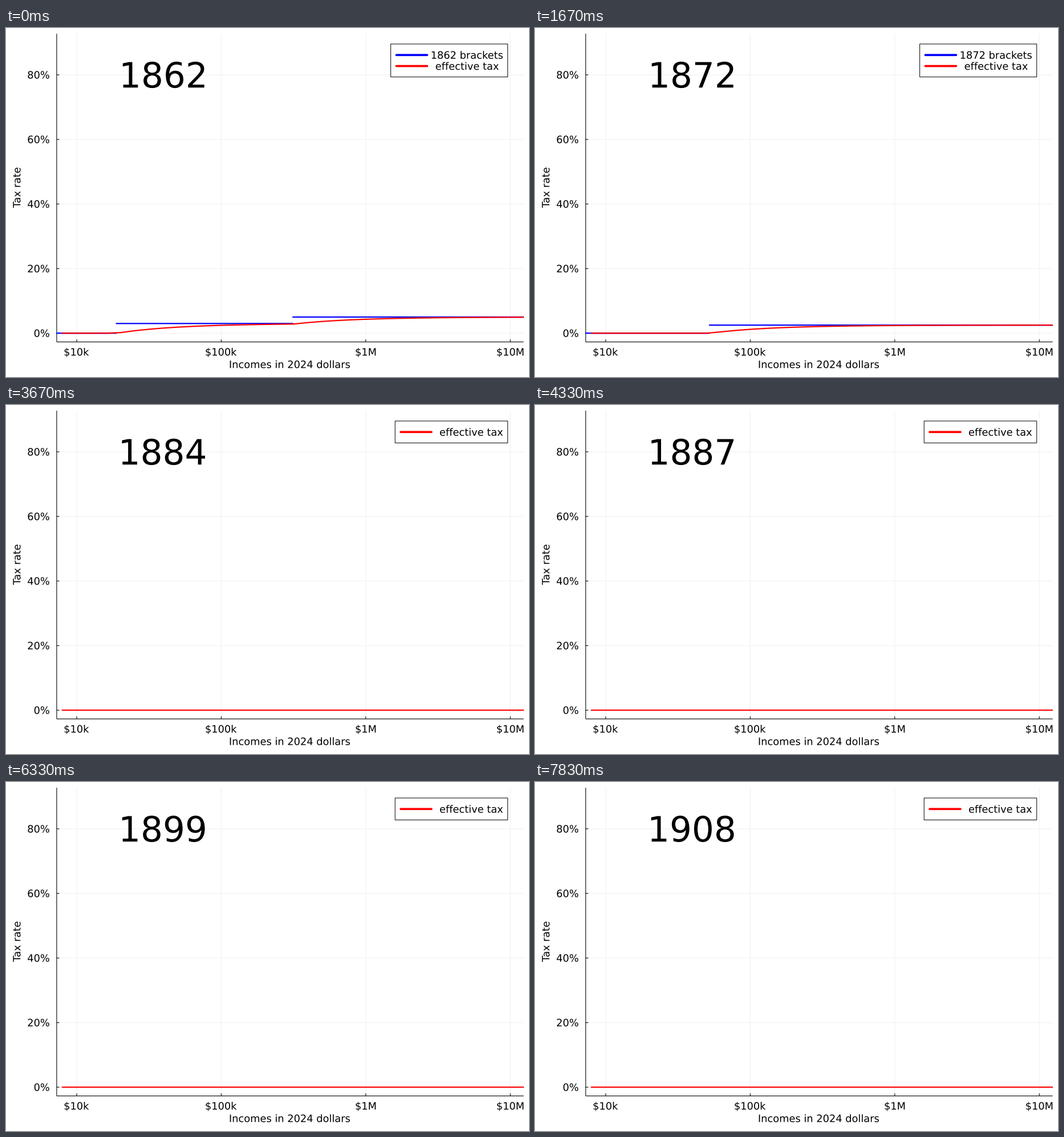
Animation of 917x611 px, one loop 8000 ms. Source, as a matplotlib script:

```python
import numpy as np
import matplotlib.pyplot as plt
from matplotlib.animation import FuncAnimation
from matplotlib.patches import PathPatch, Rectangle
from matplotlib.path import Path
from matplotlib.textpath import TextPath

W, H, DPI = 917, 611, 100
LEFT, RIGHT, TOP, BOTTOM = 88.9, 907.6, 10, 549.6
FIRST_YEAR, YEARS, LOOP_MS = 1862, 48, 8000
SIZE, BIG = 17.8, 61.2
CAP = 0.729  # cap height of the font, in em

# Price index by year; 2024 on the same scale
CPI_2024 = 939
CPI = {1862: 30, 1863: 37, 1864: 47, 1865: 46, 1866: 44, 1867: 42,
       1868: 40, 1869: 40, 1870: 38, 1871: 36, 1872: 36, 1894: 26}

# (first year, last year, [(threshold in dollars of the day, rate in %)])
LAWS = [
    (1862, 1863, [(600, 3), (10000, 5)]),
    (1864, 1864, [(600, 5), (5000, 7.5), (10000, 10)]),
    (1865, 1866, [(600, 5), (5000, 10)]),
    (1867, 1869, [(1000, 5)]),
    (1870, 1872, [(2000, 2.5)]),
    (1894, 1894, [(4000, 2)]),
]

plt.rcParams["path.snap"] = False
plt.rcParams["font.family"] = "DejaVu Sans"

fig = plt.figure(figsize=(W / DPI, H / DPI), dpi=DPI, facecolor="white")
ax = fig.add_axes([0, 0, 1, 1])
ax.set_xlim(0, W)
ax.set_ylim(H, 0)
ax.axis("off")
plot_area = Rectangle((LEFT - 0.5, TOP), RIGHT - LEFT + 0.5, BOTTOM - TOP,
                      transform=ax.transData)


def x_pos(income):
    return 124 + 253.4 * (np.log10(income) - 4)


def y_pos(rate):
    return 534.3 - 5.654 * np.asarray(rate)


def line(xs, ys, color, width, z=2, cap="round", clip=False):
    art, = ax.plot(xs, ys, color=color, lw=width * 72 / DPI, zorder=z,
                   solid_capstyle=cap, solid_joinstyle="round")
    if clip:
        art.set_clip_path(plot_area)
    return art


def text(s, x, y, size=SIZE, align=0.5, upright=False):
    """Place text by its ink: align 0 left, 0.5 centre, 1 right; y is mid-cap."""
    path = TextPath((0, 0), s, size=size)
    v = path.vertices.copy()
    box = path.get_extents()
    v[:, 0] -= box.x0 + align * box.width
    v[:, 1] = CAP * size / 2 - v[:, 1]
    if upright:
        v = np.column_stack([v[:, 1], -v[:, 0]])
    return ax.add_patch(PathPatch(Path(v + [x, y], path.codes),
                                  fc="black", lw=0, zorder=6))


def law_for(year):
    for start, end, steps in LAWS:
        if start <= year <= end:
            scale = CPI_2024 / CPI[year]
            return [(limit * scale, rate) for limit, rate in steps]
    return []


def effective(income, steps):
    tax = np.zeros_like(income)
    last = 0
    for limit, rate in steps:
        tax += (rate - last) * np.maximum(income - limit, 0)
        last = rate
    return tax / income


def draw_frame():
    for rate in range(0, 100, 20):
        y = y_pos(rate)
        line([LEFT, RIGHT], [y, y], "#f0f0f0", 1, 0, "butt")
        line([LEFT, LEFT + 4.5], [y, y], "black", 1.1, 1, "butt")
        text(f"{rate}%", 75.8, y, align=1)
    for power, label in enumerate(["$10k", "$100k", "$1M", "$10M"], 4):
        x = x_pos(10.0 ** power)
        line([x, x], [TOP, BOTTOM], "#f0f0f0", 1, 0, "butt")
        line([x, x], [BOTTOM, BOTTOM - 4.5], "black", 1.1, 1, "butt")
        text(label, x, 567)
    line([LEFT, LEFT], [TOP, BOTTOM], "black", 1.1, 1, "butt")
    line([LEFT, RIGHT], [BOTTOM, BOTTOM], "black", 1.1, 1, "butt")
    text("Incomes in 2024 dollars", 497.8, 588.8)
    text("Tax rate", 18.8, 279.7, upright=True)


def draw_legend(entries, left, bottom, mid):
    box = Rectangle((left, 28), 879.7 - left, bottom - 28, fc="white",
                    ec="black", lw=0.72, zorder=4)
    arts = [ax.add_patch(box)]
    for i, (label, color) in enumerate(entries):
        y = 47.3 + 19.3 * i
        arts.append(line([left + 9.8, left + 63.8], [y, y], color, 3.7, 5))
        arts.append(text(label, mid, y))
    return arts


incomes = 10 ** np.arange(3.9, 7.25, 0.1)
moving = []


def clear():
    while moving:
        moving.pop().remove()
    return []


def update(i):
    clear()
    year = FIRST_YEAR + i
    steps = law_for(year)
    entries = [("effective tax", "red")]
    if steps:
        entries.insert(0, (f"{year} brackets", "blue"))
        edges = [LEFT] + [x_pos(limit) for limit, _ in steps] + [RIGHT + 5]
        rates = [0] + [rate for _, rate in steps]
        for a, b, rate in zip(edges, edges[1:], rates):
            y = y_pos(rate)
            moving.append(line([a, b], [y, y], "blue", 2.2, 2, clip=True))
        moving.extend(draw_legend(entries, 674.6, 85.7, 808.7))
    else:
        moving.extend(draw_legend(entries, 682.2, 66.4, 816))
    moving.append(line(x_pos(incomes), y_pos(effective(incomes, steps)),
                       "red", 2.2, 3, clip=True))
    moving.append(text(str(year), 276.2, y_pos(80), BIG))
    return moving


draw_frame()
anim = FuncAnimation(fig, update, frames=YEARS, init_func=clear,
                     interval=LOOP_MS / YEARS, repeat=True, repeat_delay=0,
                     blit=False)
plt.show()
```
